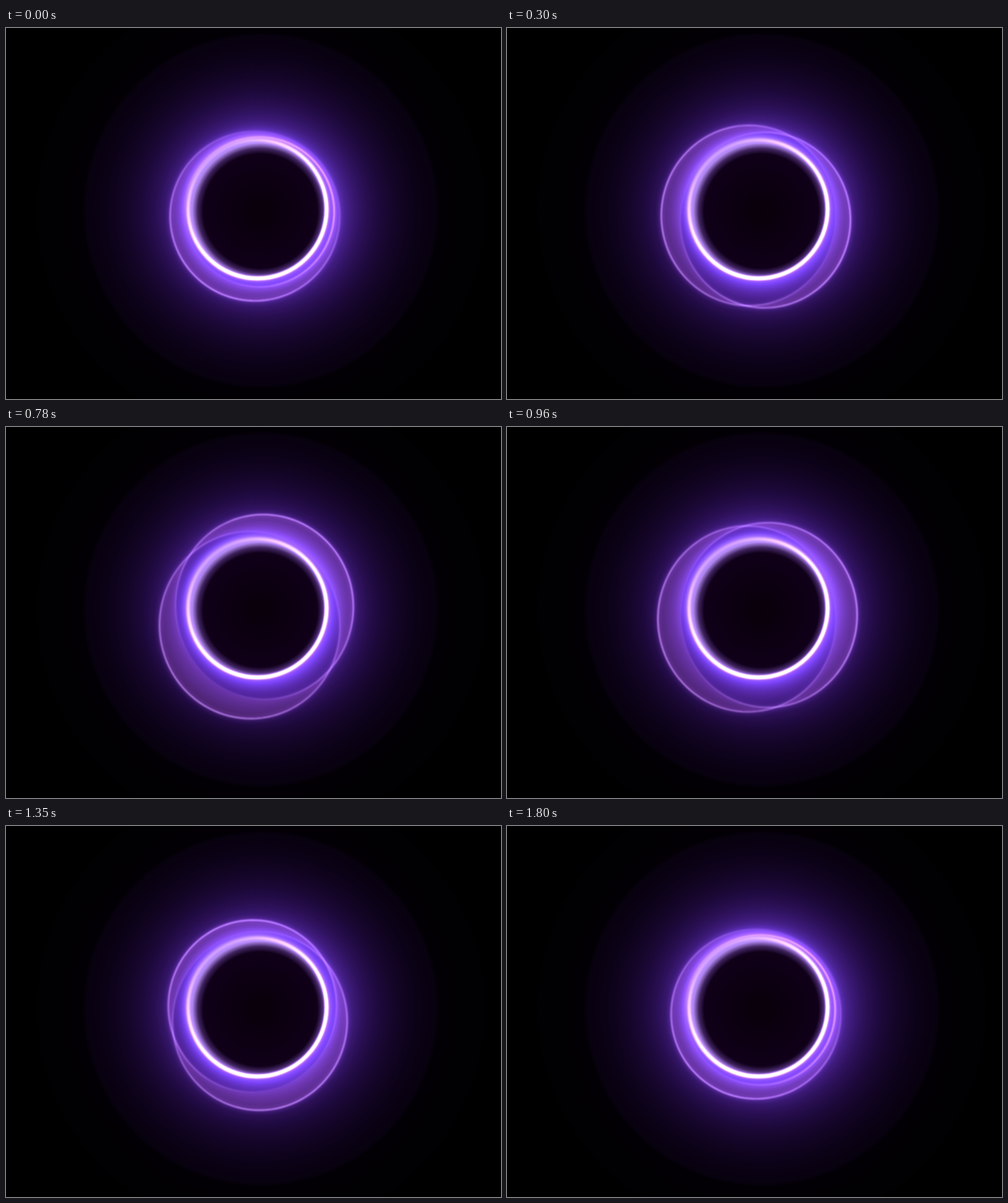
An HTML page with a canvas for the animation above (1.83 s loop, 800 by 600 pixels).

```html
<!DOCTYPE html>
<html lang="en">
<head>
<meta charset="utf-8">
<title>Glowing ring</title>
<style>
  html, body { margin: 0; width: 100%; height: 100%; overflow: hidden; background: #000; }
  canvas { display: block; }
</style>
</head>
<body>
<canvas id="stage" width="800" height="600"></canvas>
<script>
const ctx = document.getElementById('stage').getContext('2d');
const TAU = Math.PI * 2, RAD = Math.PI / 180;
const LOOP = 1830, STEP = 30;
const { sin, cos } = Math;

// Veils turn once per loop, roughly opposite each other, and swell midway.
const VEILS = [
  { angle: 143, sway: 25, radius: 137, swell: 9 },
  { angle: 330, sway: 0, radius: 121, swell: 27 }
];

function pose(veil, p) {
  const swell = sin(Math.PI * p ** 0.8);
  const dir = (veil.angle + 360 * p - veil.sway * sin(TAU * p + 56 * RAD)) * RAD;
  const bulge = 5 + 14 * swell;
  const path = new Path2D();
  for (let i = 0; i < 120; i++) {
    const a = i / 120 * TAU;
    const r = veil.radius + veil.swell * swell + bulge * cos(a - dir) - 3 * swell * cos(2 * a);
    path.lineTo(405 + r * cos(a), 300 + 5 * swell + r * sin(a));
  }
  path.closePath();
  return { path, dir };
}

function circle(x, y, r) {
  const path = new Path2D();
  path.arc(x, y, r, 0, TAU);
  return path;
}

// Colour whose strength peaks towards one direction
function lit(x, y, dir, rgb, mid, swing) {
  const g = ctx.createConicGradient(dir, x, y);
  for (let i = 0; i <= 24; i++) {
    const alpha = Math.min(1, Math.max(0, mid + swing * cos(i / 24 * TAU)));
    g.addColorStop(i / 24, `rgba(${rgb},${alpha})`);
  }
  return g;
}

function makeHalo() {
  const size = 400, g = ctx.createRadialGradient(412, 295, 0, 412, 295, size);
  for (let r = 100; r <= size; r += 4) {
    const e = Math.exp((118 - r) / 65) * (r > 284 ? 0.35 : 1);
    g.addColorStop(r / size, `rgb(${92 * e},${50 * e ** 1.5},${184 * e})`);
  }
  return g;
}

function makeHole() {
  const g = ctx.createRadialGradient(411, 296, 0, 411, 296, 110);
  g.addColorStop(0, '#080009');
  g.addColorStop(0.5, '#0c0012');
  g.addColorStop(0.84, '#100019');
  g.addColorStop(0.92, 'rgba(28,4,50,.75)');
  g.addColorStop(1, 'rgba(50,20,80,0)');
  return g;
}

const halo = makeHalo(), hole = makeHole();
const shine = lit(406, 293, 55 * RAD, '255,248,255', 0.65, 0.55);
const body = circle(405, 291, 114);
const ring = circle(406, 293, 112);
const pit = circle(411, 296, 110);

function fill(path, color, blur, rule = 'nonzero') {
  ctx.filter = blur ? `blur(${blur}px)` : 'none';
  ctx.fillStyle = color;
  ctx.fill(path, rule);
}

function stroke(path, color, width, blur) {
  ctx.filter = `blur(${blur}px)`;
  ctx.strokeStyle = color;
  ctx.lineWidth = width;
  ctx.stroke(path);
}

function draw(now) {
  const t = Math.floor(now % LOOP / STEP) * STEP;
  const veils = VEILS.map(v => pose(v, t / (LOOP - STEP)));
  const both = new Path2D();
  veils.forEach(v => both.addPath(v.path));

  ctx.globalCompositeOperation = 'source-over';
  ctx.filter = 'none';
  ctx.fillStyle = halo;
  ctx.fillRect(0, 0, 800, 600);

  ctx.globalCompositeOperation = 'lighter';
  fill(both, 'rgb(14,6,24)', 14);
  fill(both, 'rgb(28,18,20)', 2, 'evenodd');
  for (const { path, dir } of veils) {
    stroke(path, lit(405, 302, dir, '120,70,170', 0.13, 0.1), 7, 3);
    stroke(path, lit(405, 302, dir, '215,180,225', 0.3, 0.25), 2.2, 0.8);
  }
  stroke(ring, 'rgba(95,60,220,.35)', 24, 9);

  ctx.globalCompositeOperation = 'source-over';
  fill(body, 'rgba(178,148,212,.7)', 4);
  fill(pit, hole, 0);

  ctx.globalCompositeOperation = 'lighter';
  stroke(ring, 'rgba(140,95,230,.25)', 9, 4);
  stroke(ring, shine, 5, 1.6);
  requestAnimationFrame(draw);
}
requestAnimationFrame(draw);
</script>
</body>
</html>
```
